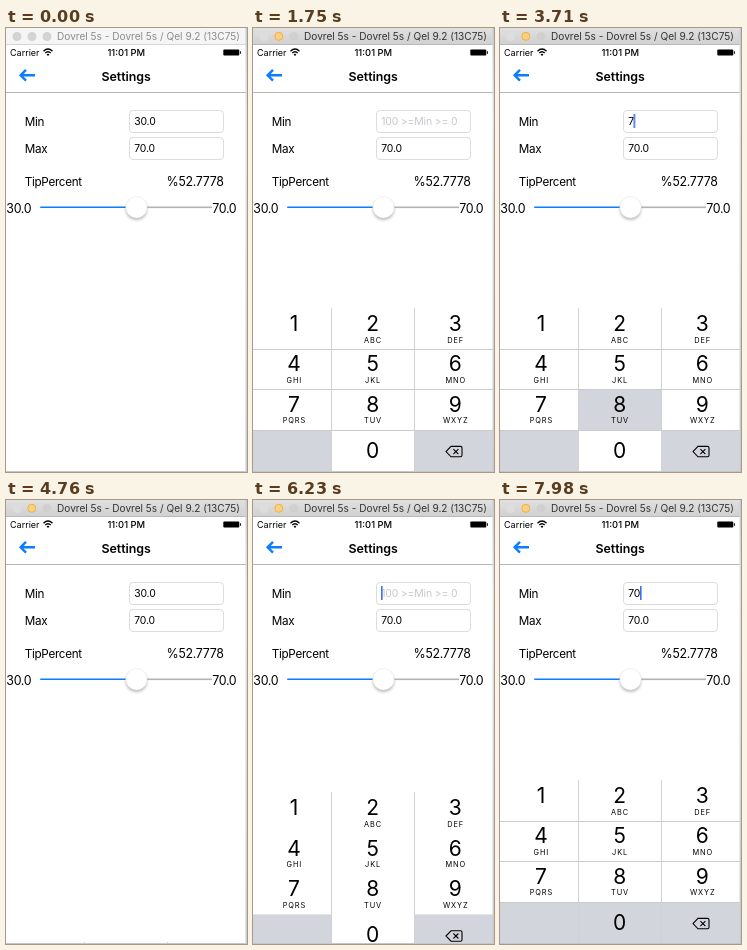
An HTML page that plays this animation: 241 by 444 pixels, repeating every 8000 ms.

```html
<!DOCTYPE html>
<html lang="en">
<head>
<meta charset="utf-8">
<title>Tip settings</title>
<style>
  html, body { margin: 0; width: 100%; height: 100%; overflow: hidden; background: #fff; }
  svg { display: block; width: 100%; height: 100%; font-family: Inter, Roboto, "Liberation Sans", sans-serif; }
  rect { shape-rendering: crispEdges; }
  .round { shape-rendering: auto; }
  .title { font-size: 10.1px; }
  .status { font-size: 9px; }
  .label { font-size: 11.7px; letter-spacing: -.3px; }
  .value { font-size: 12.4px; letter-spacing: -.3px; }
  .entry { font-size: 10.4px; letter-spacing: -.15px; }
  .digit { font-size: 21px; text-anchor: middle; }
  .letters { font-size: 7.4px; letter-spacing: .9px; text-anchor: middle; }

  /* 8 s loop: 1 % is 80 ms */
  .a { animation: 8s step-end infinite; }
  .idle { animation-name: idle; }
  .saved { animation-name: saved; }
  .hint { animation-name: hint; }
  .seven { animation-name: seven; }
  .wrong { animation-name: wrong; }
  .seventy { animation-name: seventy; }
  .caret { animation-name: caret; }
  .blink { animation: blink 8s linear infinite; }
  .pad { animation: pad 8s linear infinite; }
  .rules { animation-name: rules; }
  .press7 { animation-name: press7; }
  .press8 { animation-name: press8; }
  .press0 { animation-name: press0; }

  @keyframes idle { 0% { opacity: 1 } 11.375%, 100% { opacity: 0 } }
  @keyframes saved { 0%, 55.125% { opacity: 1 } 12.25%, 75.25%, 100% { opacity: 0 } }
  @keyframes hint { 0%, 33.25%, 93.625%, 100% { opacity: 0 } 12.25%, 75.25% { opacity: 1 } }
  @keyframes seven { 0%, 47.25%, 99.75%, 100% { opacity: 0 } 33.25%, 93.625% { opacity: 1 } }
  @keyframes wrong { 0%, 55.125%, 100% { opacity: 0 } 47.25% { opacity: 1 } }
  @keyframes seventy { 0% { opacity: 0 } 99.75%, 100% { opacity: 1 } }
  @keyframes caret {
    0%, 55.125% { transform: translateX(0) }
    33.25%, 93.625% { transform: translateX(5.5px) }
    47.25%, 99.75%, 100% { transform: translateX(12px) }
  }
  @keyframes blink {
    0%, 12.24% { opacity: 0 }
    12.25%, 20.125% { opacity: 1 }
    21.875%, 25.375% { opacity: 0 }
    28%, 38.5% { opacity: 1 }
    41.125%, 46.37% { opacity: 0 }
    46.375%, 55.12% { opacity: 1 }
    55.125%, 75.24% { opacity: 0 }
    75.25%, 82.25% { opacity: 1 }
    84.875%, 87.5% { opacity: 0 }
    90.125%, 100% { opacity: 1 }
  }
  @keyframes pad {
    0% { transform: translateY(164px) }
    12.375%, 74.8375% { transform: translateY(164px); animation-timing-function: cubic-bezier(.38, .7, .125, 1) }
    18.625%, 81.0875%, 100% { transform: translateY(0) }
    55% { transform: translateY(0); animation-timing-function: cubic-bezier(.38, .7, .125, 1) }
    61.25% { transform: translateY(164px) }
  }
  /* the hairlines between rows only show while the pad rests */
  @keyframes rules { 0%, 55% { opacity: 0 } 18.625%, 81.0875%, 100% { opacity: 1 } }
  @keyframes press7 { 0%, 34.125%, 94.5%, 100% { opacity: 0 } 32.375%, 92.75% { opacity: 1 } }
  @keyframes press8 { 0%, 48.125%, 100% { opacity: 0 } 46.375% { opacity: 1 } }
  @keyframes press0 { 0% { opacity: 0 } 98.875%, 100% { opacity: 1 } }
</style>
</head>
<body>
<svg viewBox="0 0 241 444" preserveAspectRatio="none">
  <defs>
    <linearGradient id="bar" x2="0" y2="1">
      <stop stop-color="#e0e0e1"/><stop offset="1" stop-color="#d0d0d1"/>
    </linearGradient>
    <linearGradient id="edge" x2="0" y2="1">
      <stop stop-color="#c3ccd6"/><stop offset=".2" stop-color="#dfe3e8"/>
      <stop offset=".6" stop-color="#d3d8de"/><stop offset="1" stop-color="#c6cbd2"/>
    </linearGradient>
    <filter id="soft" x="-50%" y="-50%" width="200%" height="200%">
      <feGaussianBlur stdDeviation="1.5"/>
    </filter>
  </defs>

  <rect width="241" height="444" fill="#fff"/>

  <!-- window title -->
  <rect width="240" height="17" fill="url(#bar)"/>
  <rect y="16" width="240" height="1" fill="#b9b9b9"/>
  <circle cx="11" cy="8.5" r="4.5" fill="#dedcdc"/>
  <circle cx="25.8" cy="8.3" r="4" fill="#fbd084" stroke="#f3b03a"/>
  <circle cx="41" cy="8.5" r="4.5" fill="#d0d0d0"/>
  <text class="title" x="51" y="12.2" fill="#333">Dovrel 5s - Dovrel 5s / Qel 9.2 (13C75)</text>
  <g class="a idle">
    <rect width="240" height="17" fill="#f5f5f5"/>
    <rect y="16" width="240" height="1" fill="#d6d6d6"/>
    <g fill="#d3d3d3">
      <circle cx="11" cy="8.5" r="4.5"/><circle cx="26" cy="8.5" r="4.5"/><circle cx="41" cy="8.5" r="4.5"/>
    </g>
    <text class="title" x="51" y="12.2" fill="#8c8c8c">Dovrel 5s - Dovrel 5s / Qel 9.2 (13C75)</text>
  </g>

  <!-- status and navigation -->
  <rect y="64" width="240" height="1" fill="#b6b6b6"/>
  <text class="status" x="4" y="27.5">Carrier</text>
  <g fill="none" stroke="#000" stroke-width="1.3">
    <path d="M37.5 23.2Q42 18.8 46.5 23.2M39.3 25Q42 22.4 44.7 25"/>
  </g>
  <path d="M40.6 26.4Q42 25.2 43.4 26.4L42 28Z"/>
  <text x="120.3" y="27.5" font-size="9.4" text-anchor="middle" font-weight="500">11:01 PM</text>
  <rect class="round" x="217.3" y="21.5" width="16" height="6" rx="1"/>
  <path d="M234 23.2h.9v2.6h-.9z"/>
  <path d="M14.6 47.3H29M20 41.9L14.6 47.3L20 52.7" fill="none" stroke="#0b7dff" stroke-width="2.4"/>
  <text x="120.2" y="52.5" font-size="12.4" font-weight="600" text-anchor="middle">Settings</text>

  <!-- form -->
  <g class="label">
    <text x="18.7" y="97.5">Min</text>
    <text x="18.7" y="124.5">Max</text>
    <text x="18.7" y="158">TipPercent</text>
  </g>
  <g fill="#fff" stroke="#dcdcdc">
    <rect class="round" x="123.5" y="82.5" width="94" height="22" rx="3.5"/>
    <rect class="round" x="123.5" y="109.5" width="94" height="22" rx="3.5"/>
  </g>
  <g class="entry">
    <text class="a saved" x="128.2" y="97.3">30.0</text>
    <text class="a hint" x="128.2" y="97.3" fill="#c7c7cd">100 &gt;=Min &gt;= 0</text>
    <text class="a seven" x="128.2" y="97.3">7</text>
    <text class="a wrong" x="128.2" y="97.3">78</text>
    <text class="a seventy" x="128.2" y="97.3">70</text>
    <text x="128.2" y="124.3">70.0</text>
  </g>
  <g class="a caret"><rect class="round blink" x="128" y="86" width="1.6" height="14" fill="#3f6cf0"/></g>

  <g class="value">
    <text x="217.7" y="158.3" text-anchor="end">%52.7778</text>
    <text x=".3" y="184.6">30.0</text>
    <text x="206.2" y="184.6">70.0</text>
  </g>
  <rect class="round" x="126" y="178.5" width="80" height="1.6" fill="#b4b4b4"/>
  <rect class="round" x="34" y="178.5" width="92" height="1.6" rx=".8" fill="#0a7cff"/>
  <circle cx="130.5" cy="181.5" r="10.6" fill="#000" opacity=".28" filter="url(#soft)"/>
  <circle cx="130.5" cy="179.3" r="10.7" fill="#fff" stroke="#e0e0e0" stroke-width=".5"/>

  <g class="pad" id="pad"></g>

  <!-- window edges -->
  <rect x="0" y="443" width="241" height="1" fill="#c4c7cb"/>
  <rect class="round" x="239.5" y="0" width="1.5" height="444" fill="url(#edge)"/>
</svg>
<script>
  const LOOP = 8000, STEP = 70;
  const left = [0, 79, 162], wide = [78, 82, 78], mid = [41, 119.7, 202.3];
  const top4 = [280, 321, 361, 402];
  const names = ['', 'ABC', 'DEF', 'GHI', 'JKL', 'MNO', 'PQRS', 'TUV', 'WXYZ'];

  const box = (x, y, w, h, fill, cls = '') =>
    `<rect class="${cls}" x="${x}" y="${y}" width="${w}" height="${h}" fill="${fill}"/>`;
  const cell = (col, row, cls) => box(left[col], top4[row], wide[col], 41, '#d2d5db', cls);
  const label = (cls, x, y, text) => `<text class="${cls}" x="${x}" y="${y}">${text}</text>`;

  let keys = box(0, 280, 240, 164, '#fff') + cell(0, 3) + cell(2, 3) +
    cell(0, 2, 'a press7') + cell(1, 2, 'a press8') + cell(1, 3, 'a press0');
  for (const y of top4.slice(1)) keys += box(0, y, 240, 1, '#c9cbcf', 'a rules');
  for (const x of [78, 161]) keys += box(x, 280, 1, 164, '#cfd1d4');
  names.forEach((name, i) => {
    const x = mid[i % 3], y = 280 + Math.floor(i / 3) * 40.4;
    keys += label('digit', x, y + 23, i + 1) + label('letters', x + .4, y + 34.5, name);
  });
  keys += label('digit', mid[1], 430, 0) +
    `<g fill="none" stroke="#000" stroke-width="1.1">
      <path d="M193 423.6L198 418.4H207.5Q209 418.4 209 419.9V427.3Q209 428.8 207.5 428.8H198Z"/>
      <path d="M200.4 421.1L205.4 426.1M205.4 421.1L200.4 426.1"/>
    </g>`;
  document.getElementById('pad').innerHTML = keys;

  const anims = document.getAnimations();
  anims.forEach(a => a.pause());
  const start = performance.now();
  function tick() {
    const t = (performance.now() - start) % LOOP;
    const held = Math.floor(t / STEP) * STEP + .01;
    anims.forEach(a => { a.currentTime = held; });
    requestAnimationFrame(tick);
  }
  tick();
</script>
</body>
</html>
```
